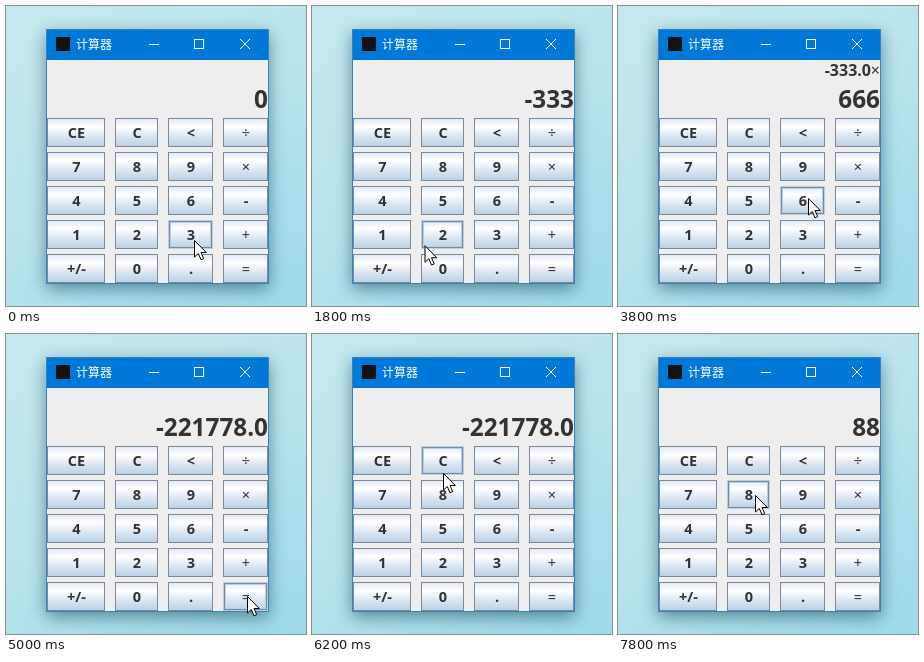
An HTML page with a canvas for the animation above (8 s loop, 300 by 300 pixels).

```html
<!DOCTYPE html>
<html lang="zh">
<head>
<meta charset="utf-8">
<title>计算器</title>
<style>
html, body { margin: 0; width: 100%; height: 100%; overflow: hidden; }
canvas { display: block; width: 300px; height: 300px; }
</style>
</head>
<body>
<canvas id="stage" width="300" height="300"></canvas>
<script>
const ctx = document.getElementById('stage').getContext('2d');
const LOOP = 8000, STEP = 200;
const FONT = '"Noto Sans", "Open Sans", sans-serif';
const INK = '#333333', SHADOW = '#7a8a99', PRIMARY = '#b8cfe5';
const COLS = [[41, 58], [109, 43], [162, 45], [217, 45]];
const ROWS = ['CE C < ÷', '7 8 9 ×', '4 5 6 -', '1 2 3 +', '+/- 0 . ='];

const buttons = ROWS.flatMap((row, r) => row.split(' ').map((label, c) => ({
  label, x: COLS[c][0], y: 112 + 34 * r, w: COLS[c][1], h: 29
})));

// The pointer rests on each key, off-centre by dx, dy; the last click comes on leaving.
const visits = [
  { key: '3', arrive: 0, leave: 600, clicks: 3, dx: 3.5, dy: 5.5 },
  { key: '+/-', arrive: 1200, leave: 1600, clicks: 1, dx: 0, dy: 5.5 },
  { key: '×', arrive: 2400, leave: 2600, clicks: 1, dx: 0.5, dy: -7.5 },
  { key: '6', arrive: 3200, leave: 3800, clicks: 3, dx: 5.5, dy: -2.5 },
  { key: '=', arrive: 4600, leave: 5000, clicks: 1, dx: 1.5, dy: -0.5 },
  { key: 'C', arrive: 6000, leave: 6400, clicks: 1, dx: 0.5, dy: 12.5 },
  { key: '8', arrive: 7000, leave: 7800, clicks: 2, dx: 6.5, dy: 0.5 }
];

for (const v of visits) {
  const b = buttons.find(b => b.label === v.key);
  v.x = b.x + b.w / 2 + v.dx;
  v.y = b.y + b.h / 2 + v.dy;
}

function pointerAt(t) {
  const next = visits.findIndex(v => v.leave >= t);
  if (next <= 0) return visits.at(next);
  const a = visits[next - 1], b = visits[next];
  const u = Math.min(1, (t - a.leave) / (b.arrive - a.leave));
  return { x: a.x + (b.x - a.x) * u, y: a.y + (b.y - a.y) * u };
}

function press(s, key) {
  if (key === 'C') return { shown: '0', pending: '', fresh: true };
  if (key === '+/-') return { ...s, shown: String(-s.shown) };
  if (key === '×') return { ...s, pending: Number(s.shown).toFixed(1), fresh: true };
  if (key === '=') return { shown: (s.pending * s.shown).toFixed(1), pending: '', fresh: true };
  return { ...s, shown: s.fresh ? key : s.shown + key, fresh: false };
}

function calculatorAt(t) {
  let state = press({}, 'C');
  for (const v of visits) {
    for (let i = v.clicks - 1; i >= 0; i--) {
      if (v.leave - i * STEP <= t) state = press(state, v.key);
    }
  }
  return state;
}

function rect(x, y, w, h, fill) {
  ctx.fillStyle = fill;
  ctx.fillRect(x, y, w, h);
}

function frame(b, inset, color) {
  ctx.strokeStyle = color;
  ctx.lineWidth = 1;
  const d = inset + 0.5;
  ctx.strokeRect(b.x + d, b.y + d, b.w - 2 * d, b.h - 2 * d);
}

function text(str, x, y, font, color, align) {
  ctx.font = font;
  ctx.fillStyle = color;
  ctx.textAlign = align;
  ctx.fillText(str, x, y);
}

function line(x0, y0, x1, y1) {
  ctx.beginPath();
  ctx.moveTo(x0, y0);
  ctx.lineTo(x1, y1);
  ctx.stroke();
}

function gradient(x0, y0, x1, y1, stops) {
  const g = ctx.createLinearGradient(x0, y0, x1, y1);
  stops.forEach(([at, color]) => g.addColorStop(at, color));
  return g;
}

function drawDesktop() {
  rect(0, 0, 300, 300, gradient(60, 0, 240, 300,
    [[0, '#c3e8ed'], [0.5, '#b9e4ec'], [1, '#9fdbe9']]));
}

function drawWindow() {
  ctx.save();
  ctx.shadowColor = 'rgba(0, 45, 65, 0.5)';
  ctx.shadowBlur = 16;
  ctx.shadowOffsetY = 5;
  rect(40, 23, 223, 255, '#3a82bd');
  ctx.restore();
  rect(41, 24, 221, 30, '#0078d7');
  rect(41, 54, 221, 223, '#eeeeee');
  rect(50, 31, 14, 14, '#111');
  text('计算器', 70, 42.5, '12px "Noto Sans CJK SC", "Noto Sans CJK", sans-serif', '#fff', 'left');
  ctx.strokeStyle = '#fff';
  ctx.lineWidth = 1;
  line(143, 38.5, 153, 38.5);
  ctx.strokeRect(188.5, 33.5, 9, 9);
  line(234, 33, 244, 43);
  line(244, 33, 234, 43);
}

function drawDisplay({ shown, pending }) {
  if (pending) {
    text('×', 262, 69.5, '16px ' + FONT, INK, 'right');
    text(pending, 253, 69.5, 'bold 16px ' + FONT, INK, 'right');
  }
  text(shown, 262, 102, 'bold 24.3px ' + FONT, INK, 'right');
}

function drawButton(b, hover) {
  rect(b.x, b.y, b.w, b.h, gradient(0, b.y, 0, b.y + b.h,
    [[0, '#dde8f3'], [0.3, '#ffffff'], [0.6, '#dde8f3'], [1, PRIMARY]]));
  const borders = hover ? [PRIMARY, SHADOW, PRIMARY] : [SHADOW];
  borders.forEach((color, i) => frame(b, i, color));
  const weight = '÷×+='.includes(b.label) ? '' : 'bold ';
  text(b.label, b.x + b.w / 2 + 0.5, b.y + 20, weight + '14.5px ' + FONT, INK, 'center');
}

function drawPointer({ x, y }) {
  const arrow = [[0, 0], [0, 16.5], [3.8, 13], [6.5, 19.3], [9.2, 18.1], [6.5, 12], [11.8, 12]];
  ctx.beginPath();
  arrow.forEach(([dx, dy]) => ctx.lineTo(x + 0.5 + dx, y + 0.5 + dy));
  ctx.closePath();
  ctx.fillStyle = '#fff';
  ctx.fill();
  ctx.strokeStyle = '#000';
  ctx.lineWidth = 1;
  ctx.stroke();
}

function draw(t) {
  const tip = pointerAt(t);
  drawDesktop();
  drawWindow();
  drawDisplay(calculatorAt(t));
  for (const b of buttons) {
    const hover = tip.x >= b.x && tip.x < b.x + b.w && tip.y >= b.y && tip.y < b.y + b.h;
    drawButton(b, hover);
  }
  drawPointer(tip);
}

const start = performance.now();
function tick() {
  const t = Math.max(0, performance.now() - start) % LOOP;
  draw(Math.floor(t / STEP) * STEP);
  requestAnimationFrame(tick);
}
tick();
</script>
</body>
</html>
```
